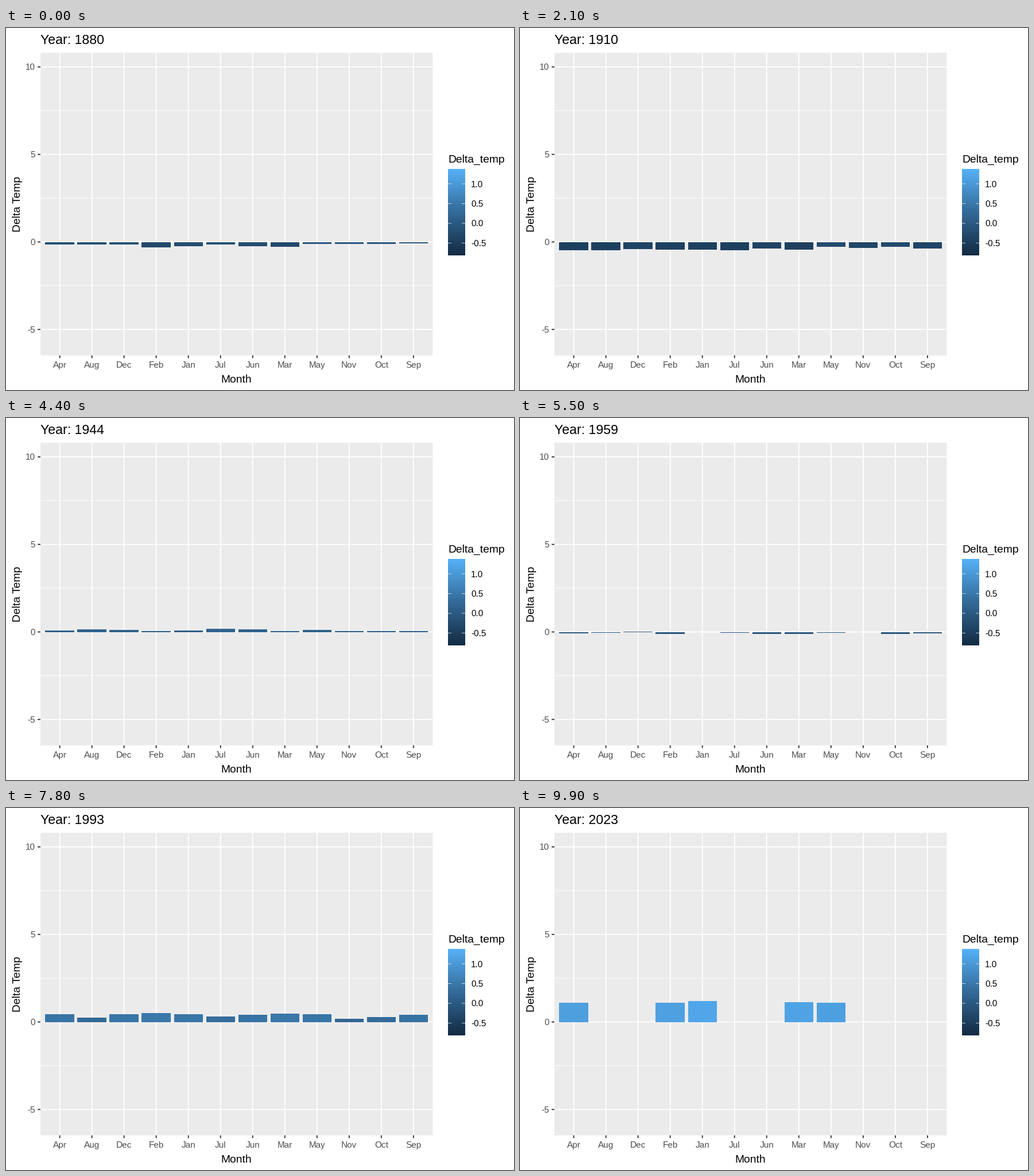
A matplotlib script for the animation above (10 s loop, 885 by 632 pixels).

```python
import matplotlib.pyplot as plt
import numpy as np
from matplotlib.animation import FuncAnimation
from matplotlib.colors import LinearSegmentedColormap, Normalize
from matplotlib.patches import Rectangle

W, H, DPI = 885, 632, 64
FRAMES, FIRST, LAST = 100, 1880, 2023
PT = 1.748                       # pixels per point of the chart theme
MAJOR, MINOR = 1.87, 0.94
LEFT, RIGHT, TOP, BOTTOM = 60, 743.5, 43.3, 571.5
ZERO, UNIT = 373.5, 30.56
STEP = (RIGHT - LEFT) / 12.2

CALENDAR = "Jan Feb Mar Apr May Jun Jul Aug Sep Oct Nov Dec".split()
MONTHS = sorted(CALENDAR)
ORDER = [CALENDAR.index(m) for m in MONTHS]

LOW, HIGH = -0.82, 1.37
SCALE = Normalize(LOW, HIGH, clip=True)
BLUES = LinearSegmentedColormap.from_list(
    "blues", ["#132B43", "#336A98", "#56B1F7"])

# Long-term course of the yearly mean: (year, degrees)
TREND = [(1880, -0.17), (1890, -0.30), (1899, -0.18), (1909, -0.46),
         (1922, -0.28), (1943, 0.10), (1950, -0.10), (1965, -0.05),
         (1977, 0.18), (1990, 0.36), (2007, 0.65), (2016, 0.95),
         (2023, 1.00)]


def data_year(i):
    """Earliest year whose time rounds to step i."""
    return FIRST + max(0, int(np.ceil((i - 0.5) * (LAST - FIRST) / (FRAMES - 1))))


def year_values(year):
    """Monthly values: trend, winter excess in warm years, smooth noise."""
    rng = np.random.default_rng(year)
    mean = np.interp(year, *zip(*TREND)) + rng.normal(0, 0.03)
    winter = np.cos(2 * np.pi * (np.arange(12) - 1.5) / 12)
    noise = rng.normal(0, 0.06, 12)
    noise += 0.4 * np.roll(noise, 1)
    values = mean + 0.12 * max(mean, 0) * winter + noise - noise.mean()
    if year == LAST:
        values[5:] = 0           # the last year ends in May
    return values[ORDER]


plt.rcParams["font.family"] = "Liberation Sans"
plt.rcParams["text.hinting"] = "native"
fig = plt.figure(figsize=(W / DPI, H / DPI), dpi=DPI, facecolor="white")
ax = fig.add_axes([0, 0, 1, 1])
ax.axis("off")


def line(x0, y0, x1, y1, color="white", width=MAJOR, z=2):
    ax.plot([x0, x1], [y0, y1], color=color, lw=width * 72 / DPI, zorder=z,
            solid_capstyle="butt", snap=False)


def label(x, y, text, size=8.8, color="black", ha="left", va="baseline", **kw):
    return ax.text(x, y, text, fontsize=size * PT * 72 / DPI, color=color,
                   ha=ha, va=va, **kw)


def rect(x, y, w, h, color, z, snap=False):
    return ax.add_patch(Rectangle((x, y), w, h, fc=color, lw=0, zorder=z,
                                  snap=snap))


# Panel, grid and axes
rect(LEFT, TOP, RIGHT - LEFT, BOTTOM - TOP, "#EBEBEB", 0)
for v in (-2.5, 2.5, 7.5):
    line(LEFT, ZERO - v * UNIT, RIGHT, ZERO - v * UNIT, width=MINOR)
for v in (-5, 0, 5, 10):
    y = ZERO - v * UNIT
    line(LEFT, y, RIGHT, y)
    line(LEFT - 2.75 * PT, y, LEFT, y, "#333333")
    label(50.5, y + 5.5, str(v), color="#4D4D4D", ha="right")

bars = []
for k, month in enumerate(MONTHS):
    x = LEFT + (0.6 + k) * STEP
    line(x, TOP, x, BOTTOM)
    line(x, BOTTOM, x, BOTTOM + 2.75 * PT, "#333333")
    label(x, 593, month, color="#4D4D4D", ha="center")
    bars.append(rect(x - 0.45 * STEP, ZERO, 0.9 * STEP, 0, "white", 3, True))

label((LEFT + RIGHT) / 2 - 0.5, 619, "Month", 11, ha="center")
label(20, (TOP + BOTTOM) / 2, "Delta Temp", 11, ha="center", va="center",
      rotation=90)
title = label(LEFT, 28, "", 13.2)

# Colour bar
X0, X1, Y0, Y1 = 770, 800, 246, 397
label(X0, 235, "Delta_temp", 11)
ax.imshow(np.linspace(HIGH, LOW, Y1 - Y0)[:, None], cmap=BLUES, norm=SCALE,
          extent=(X0, X1, Y1, Y0), aspect="auto", zorder=1,
          interpolation="nearest")
for v in (-0.5, 0.0, 0.5, 1.0):
    y = Y1 + 0.5 - (v - LOW) / (HIGH - LOW) * (Y1 - Y0)
    line(X0, y, X0 + 6, y, width=0.7)
    line(X1 - 6, y, X1, y, width=0.7)
    label(810, y + 5.5, f"{v:.1f}")

ax.set_xlim(0, W)
ax.set_ylim(H, 0)


def update(i):
    year = round(FIRST + (LAST - FIRST) * i / (FRAMES - 1))
    title.set_text(f"Year: {year}")
    for bar, value in zip(bars, year_values(data_year(i))):
        bar.set_height(-value * UNIT)
        bar.set_facecolor(BLUES(SCALE(value)))
        bar.set_visible(value != 0)
    return [title, *bars]


anim = FuncAnimation(fig, update, frames=FRAMES, interval=100, repeat=True,
                     repeat_delay=0, blit=False)
plt.show()
```
